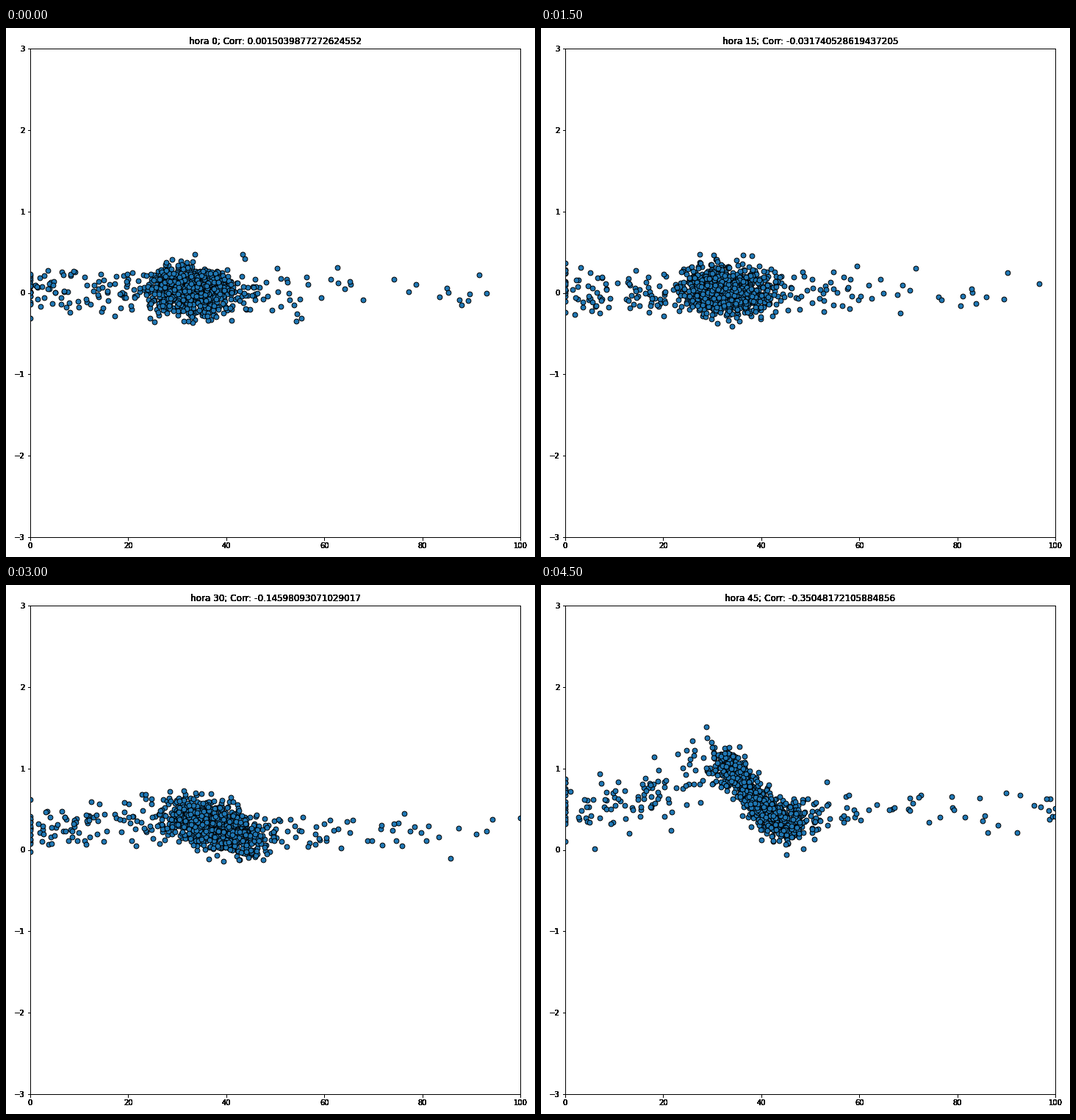
A matplotlib script for the animation above (5 s loop, 720x720 px).

```python
import numpy as np
import matplotlib.pyplot as plt
from matplotlib.animation import FuncAnimation

SIZE, DPI = 720, 72
STEP_HOURS, COUNT = 5, 10
LAYERS = 9  # stacked axes give the heavy, overprinted lettering

CORR = [
    "0.0015039877272624552", "-0.01532946170937284", "-0.026288541991756124",
    "-0.031740528619437205", "-0.03687039772568837", "-0.07416285093472618",
    "-0.14598093071029017", "-0.2542914693046844", "-0.23021416266973893",
    "-0.35048172105884856",
]


def ease(value, start, end):
    u = np.clip((value - start) / (end - start), 0, 1)
    return u * u * (3 - 2 * u)


def bell(x, center, width):
    return np.exp(-((x - center) / width) ** 2)


def trend(x, rise):
    """Flat at first, then lifted with a crest near 31 and a dip near 46."""
    crest = bell(x, 31, np.where(x < 31, 14, 7))
    return .03 + .47 * rise + .55 * rise ** 1.5 * crest - .16 * rise * bell(x, 46, 6)


def cloud(hour):
    rng = np.random.default_rng(100 + hour)
    drift, rise = ease(hour, 10, 40), ease(hour, 20, 42)
    mid, half = 32.5 + 7 * drift, 5.5 + 1.5 * drift
    x = np.concatenate([
        mid + rng.uniform(-half, half, 760) + rng.normal(0, 2.4, 760),
        rng.normal(mid, 7.5, 110),
        rng.uniform(1, 27, 85),
        mid + 8 + 56 * rng.random(65) ** 2,
        np.zeros(18),
    ])
    x = rng.permutation(np.clip(x, 0, 100))
    spread = np.where(x < mid - 9, .14 + .06 * rise, .14 - .01 * rise)
    noise = np.clip(rng.normal(0, 1, x.size), -3.2, 3.2)
    return np.column_stack([x, trend(x, rise) + spread * noise])


CLOUDS = [cloud(i * STEP_HOURS) for i in range(COUNT)]

plt.rcParams["font.family"] = "DejaVu Sans"
fig = plt.figure(figsize=(SIZE / DPI, SIZE / DPI), dpi=DPI, facecolor="white")
box = [33 / SIZE, 27 / SIZE, 667 / SIZE, 665 / SIZE]
titles = []
for i in range(LAYERS):
    ax = fig.add_axes(box, label=f"layer{i}", facecolor="none")
    ax.set_xlim(0, 100)
    ax.set_ylim(-3, 3)
    ax.set_xticks(range(0, 101, 20))
    ax.set_yticks(range(-3, 4))
    titles.append(ax.set_title("", fontsize=12))

dots = ax.scatter([], [], s=46, c="#1f77b4", edgecolors="black", linewidths=1)


def update(i):
    dots.set_offsets(CLOUDS[i])
    for title in titles:
        title.set_text(f"hora {i * STEP_HOURS}; Corr: {CORR[i]}")
    return [dots, *titles]


anim = FuncAnimation(fig, update, frames=COUNT, interval=500,
                     repeat=True, repeat_delay=0, blit=False)
plt.show()
```
